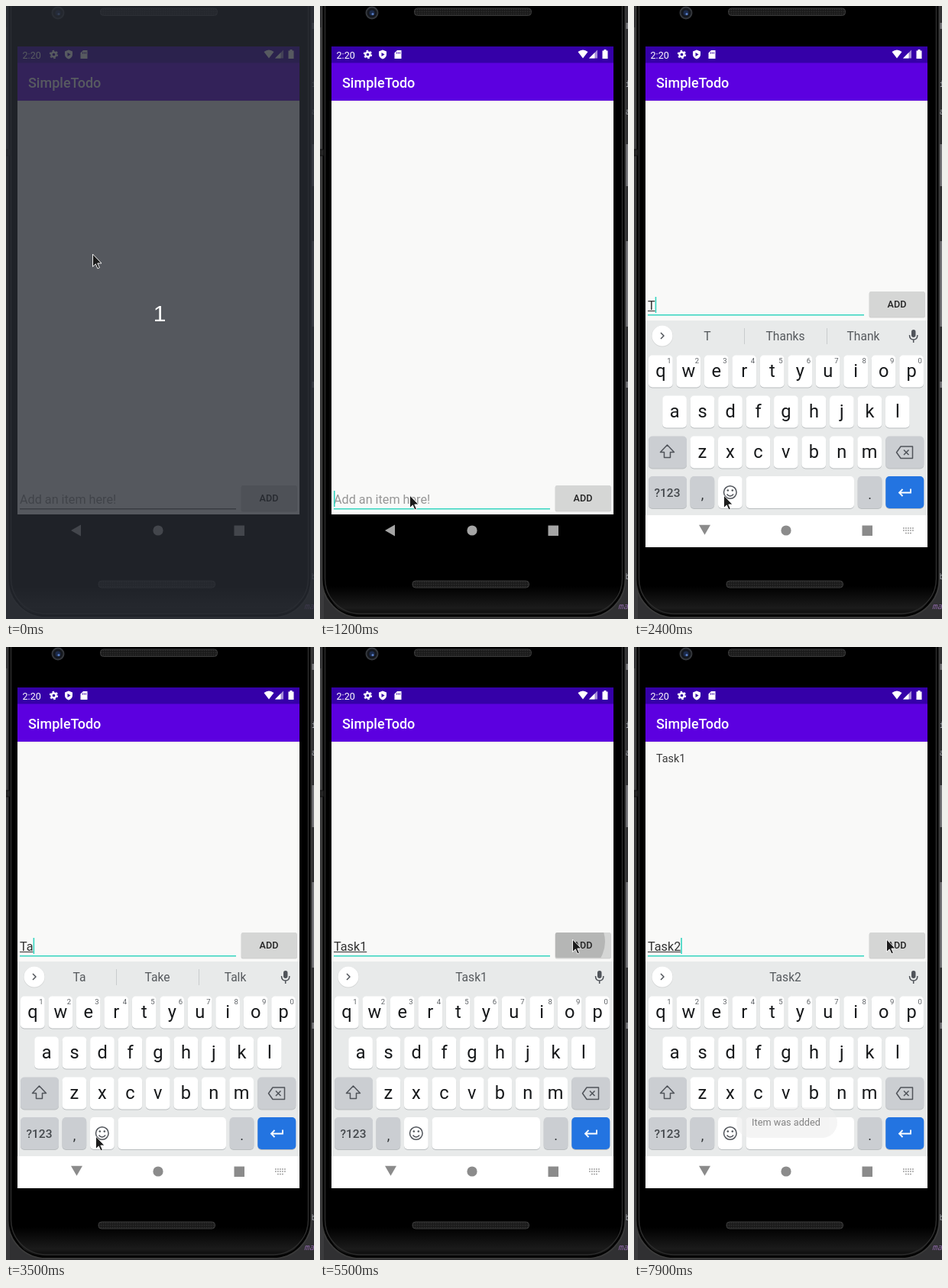
Animation, 403 px wide and 803 px high, one loop 8000 ms. Source, as an HTML page:

```html
<!DOCTYPE html>
<html lang="en">
<head>
<meta charset="utf-8">
<title>Todo app demo</title>
<style>
html, body { margin: 0; width: 100%; height: 100%; overflow: hidden; background: #000; }
svg { display: block; width: 100vw; height: 100vh; font-family: Roboto, sans-serif; }
.mid { text-anchor: middle; }
.line { fill: none; stroke: #50545a; stroke-width: 1.5; stroke-linejoin: round; }
.letter { font-size: 23.6px; fill: #16181a; text-anchor: middle; }
.sup { font-size: 9.5px; fill: #5c6064; text-anchor: middle; }
.word { font-size: 15.6px; fill: #55595d; text-anchor: middle; }
.field { font-size: 16.2px; }
</style>
</head>
<body>
<svg viewBox="0 0 403 803" preserveAspectRatio="none">
  <defs>
    <linearGradient id="bottomGloss" x2="0" y2="1">
      <stop offset="0" stop-color="#000"/><stop offset=".75" stop-color="#1b1b1b"/><stop offset="1" stop-color="#080808"/>
    </linearGradient>
    <pattern id="mesh" width="3" height="3" patternUnits="userSpaceOnUse">
      <rect width="3" height="3" fill="#1b1b1b"/><circle cx="1.5" cy="1.5" r=".8" fill="#303030"/>
    </pattern>
    <clipPath id="screenClip"><rect x="15" y="53" width="369" height="656"/></clipPath>
    <clipPath id="buttonClip"><rect x="308" y="628" width="72.500" height="33" rx="2"/></clipPath>
    <g id="gear" fill="none" stroke="currentColor">
      <circle r="3.900" stroke-width="3"/>
      <circle r="6.100" stroke-width="2.400" stroke-dasharray="3.190 3.190"/>
    </g>
  </defs>

  <!-- desktop behind the phone -->
  <rect width="403" height="803" fill="#303032"/>
  <rect y="28" width="5" height="164" fill="#4b4b4c"/>
  <rect y="196" width="5" height="607" fill="#3b3b3d"/>
  <g fill="#77777b">
    <rect x="400" y="181" width="3" height="55"/><rect x="400" y="308" width="3" height="112"/>
    <rect x="400" y="22" width="3" height="8"/><rect x="400" y="492" width="3" height="8"/>
  </g>
  <g font-family="Noto Sans Mono, monospace" font-size="11" fill="#b9bdc4">
    <text x="399.500" y="106">i</text><text x="399.500" y="142">a</text><text x="399.500" y="751">b</text>
    <text x="390" y="790" fill="#8d68a6" font-style="italic">ma</text>
  </g>

  <!-- phone body -->
  <rect x="2.500" y="-70" width="397" height="871" rx="50" fill="#000" stroke="#3a3a3a" stroke-width="2"/>
  <path d="M9 760H392Q386 797 350 798H50Q15 797 9 760Z" fill="url(#bottomGloss)"/>
  <rect x="6.500" y="-70" width="389" height="866" rx="46" fill="none" stroke="#2c2c2c" stroke-width="1.500"/>
  <path d="M0 188H5V196H0" fill="#262626" stroke="#111"/>
  <g fill="url(#mesh)" stroke="#3b3b3b">
    <rect x="123.500" y="3" width="153" height="9.500" rx="4"/>
    <rect x="121" y="753" width="152.500" height="9" rx="4"/>
  </g>
  <circle cx="68" cy="9" r="7.500" fill="#14171d" stroke="#34373c" stroke-width="2"/>
  <circle cx="68" cy="9" r="3.500" fill="#1c2b4c"/><circle cx="69" cy="10.500" r="1.500" fill="#5a80c8"/>

  <!-- app -->
  <rect x="15" y="124" width="369" height="542" fill="#f9f9f8"/>
  <rect x="15" y="53" width="369" height="22" fill="#3500a8"/>
  <rect x="15" y="74.500" width="369" height="49.500" fill="#5c00e0"/>
  <rect x="15" y="124" width="369" height="1" fill="#000" opacity=".06"/>
  <g fill="#fff" color="#fff">
    <text x="21.500" y="68.500" font-size="12.600">2:20</text>
    <text x="29" y="106.500" font-size="18" font-weight="500">SimpleTodo</text>
    <use href="#gear" transform="translate(62.500 63.500) scale(.78)"/>
    <path d="M82 57.500l5 2v4q0 4-5 6-5-2-5-6v-4Z"/>
    <path d="M80.500 61v5l4-2.500Z" fill="#3500a8"/>
    <path d="M101 58h5.500v11h-9v-7.500Z"/>
    <path d="M100.500 60.500v2m2-2v2m2-2v2" stroke="#3500a8"/>
    <path d="M337.500 60q6.500-5 13 0l-6.500 8.500Z"/>
    <path d="M363 57.500V68.500H352Z" opacity=".55"/><path d="M359.500 61V68.500H352Z"/>
    <path d="M369.500 58.500h2v-1.500h3v1.500h2v10.500h-7Z"/>
  </g>
  <text id="task" x="29" y="151" font-size="14.400" fill="#3b3b3b">Task1</text>

  <g id="entry">
    <text id="hint" class="field" x="18" y="651.500" fill="#969696">Add an item here!</text>
    <text id="typed" class="field" x="18" y="652" fill="#303030"></text>
    <rect id="underline" x="18" y="653" height="1" fill="#303030"/>
    <rect id="caret" y="635" width="1.600" height="21" fill="#35d5c0"/>
    <rect id="fieldLine" x="18" y="658" width="283" height="1.500"/>
    <rect x="307.500" y="628.500" width="73.500" height="34" rx="2.500" fill="#000" opacity=".16"/>
    <rect x="308" y="628" width="72.500" height="33" rx="2" fill="#d5d6d5"/>
    <circle id="ripple" cx="331" cy="640" clip-path="url(#buttonClip)"/>
    <text class="mid" x="344" y="649" font-size="12.600" font-weight="500" fill="#242424">ADD</text>
  </g>

  <g clip-path="url(#screenClip)">
    <g id="keyboard">
      <rect x="15" y="412" width="369" height="255" fill="#e8eaea"/>
      <rect x="15" y="667" width="369" height="70" fill="#fff"/>
      <circle cx="37" cy="432.500" r="14" fill="#000" opacity=".08"/>
      <circle cx="37" cy="432" r="13.500" fill="#fff"/>
      <path id="chevron" class="line" d="M35 428l4 4-4 4"/>
      <g id="tools" color="#50545a">
        <path class="line" d="M81 425.500h10q2 0 2 2v6l-5 5h-7q-2 0-2-2v-9q0-2 2-2ZM93 433.500h-3q-2 0-2 2v3M82.500 432q2.500 4 5 1M83 428.500v1.500m5-1.500v1.500"/>
        <text class="mid" x="139" y="436" font-size="11.500" font-weight="900" letter-spacing=".6" fill="#50545a">GIF</text>
        <path class="line" d="M187 426h12v13.500h-12ZM190.500 424.500h5v2h-5ZM189.500 430h7m-7 3h7m-7 3h5"/>
        <use href="#gear" transform="translate(246.500 432)"/>
        <path d="M279 423v18" stroke="#d0d3d4"/>
        <path d="M306 432h.01M312 432h.01M318 432h.01" stroke="#50545a" stroke-width="3.600" stroke-linecap="round"/>
      </g>
      <g id="words">
        <path id="dividers" d="M144.500 422v21M252.500 422v21" stroke="#c9cccd"/>
        <text class="word" x="96" y="438"></text>
        <text class="word" x="198" y="438"></text>
        <text class="word" x="300" y="438"></text>
      </g>
      <rect x="363" y="424" width="5.500" height="10" rx="2.700" fill="#50545a"/>
      <path class="line" d="M360.500 431q0 6 5.200 6t5.200-6M365.700 437v4"/>
      <g id="keys"></g>
      <path class="line" d="M43.500 575l-9 9.500h5v7h8v-7h5Z"/>
      <path class="line" d="M349 577h15.500v15.500H349l-5.500-7.700ZM353 581.500l6.500 6.500m0-6.500l-6.500 6.500"/>
      <text class="mid" x="43.500" y="643" font-size="15.500" font-weight="500" fill="#44484c">?123</text>
      <text class="mid" x="89.500" y="646" font-size="18" fill="#303336">,</text>
      <text class="mid" x="308.500" y="646" font-size="18" fill="#303336">.</text>
      <circle class="line" cx="125.800" cy="637" r="8.300"/>
      <path class="line" d="M121.500 639.500q4.300 5 8.600 0"/>
      <circle cx="122.800" cy="634.500" r="1.300" fill="#50545a"/><circle cx="128.800" cy="634.500" r="1.300" fill="#50545a"/>
      <path d="M362 632.500v5h-15m4.500-4.500l-4.500 4.500 4.500 4.500" fill="none" stroke="#fff" stroke-width="1.800"/>
    </g>
    <g id="nav">
      <path id="back" d="M85 687L98 679.500V694.500Z"/>
      <circle cx="199" cy="687" r="6.600"/>
      <rect x="298.500" y="680.500" width="13.500" height="13.500"/>
      <path id="imeIcon" d="M352 684h14M352 687h14M355 690.500h8" stroke="#999" stroke-width="1.500" stroke-dasharray="1.800 1.200"/>
    </g>
  </g>

  <g id="toast">
    <rect x="134" y="603" width="132" height="40" rx="20" fill="#eee"/>
    <text class="mid" x="199" y="627" font-size="12.700" fill="#303030">Item was added</text>
  </g>

  <g id="countdown">
    <rect width="403" height="803" fill="#282c34" opacity=".78"/>
    <text class="mid" x="201" y="412.500" font-family="Liberation Sans, sans-serif" font-size="30" fill="#fff">1</text>
  </g>
  <path id="cursor" d="M-.5 0V16.500l3.800-3.600 2.600 6 2.500-1.100-2.600-5.800h5.200Z" fill="#1c1c1c" stroke="#fff" stroke-width=".9"/>
</svg>

<script>
const LOOP = 8000, STEP = 100, RAISED = -254;
const $ = id => document.getElementById(id);
const show = (id, on) => $(id).setAttribute('visibility', on ? 'visible' : 'hidden');
const set = (id, attrs) => {
  for (const name in attrs) $(id).setAttribute(name, attrs[name]);
};

function buildKeys() {
  const pitch = 36.47;
  const key = (x, y, w, fill = '#fff') =>
    `<rect x="${x}" y="${y + 1}" width="${w}" height="42" rx="5" fill="#b9bdbf"/>` +
    `<rect x="${x}" y="${y}" width="${w}" height="42" rx="5" fill="${fill}"/>`;
  const row = (letters, left, y, digits) => [...letters].map((c, i) => {
    const x = left + i * pitch;
    const sup = digits ? `<text class="sup" x="${x + 27}" y="${y + 10.5}">${(i + 1) % 10}</text>` : '';
    return key(x, y, 31.7) + `<text class="letter" x="${x + 15.9}" y="${y + 28}">${c}</text>` + sup;
  }).join('');
  const gray = '#cbced2';
  $('keys').innerHTML =
    row('qwertyuiop', 19, 457.5, true) + row('asdfghjkl', 37.2, 510.5) + row('zxcvbnm', 73.5, 563.5) +
    key(19, 563.5, 50, gray) + key(329.3, 563.5, 50, gray) +
    key(19, 616, 50, gray) + key(73.5, 616, 31.7, gray) + key(110, 616, 31.7) +
    key(146.5, 616, 141.5) + key(292.7, 616, 31.7, gray) + key(329.3, 616, 50, '#2374e1');
}

// Each track lists [start time, value...]; the latest started entry holds.
const tracks = {
  cursor: [[0, 114, 325], [600, 115, 365], [700, 116, 500], [800, 118, 615], [900, 118, 641],
    [4400, 138, 612], [4500, 235, 505], [4600, 340, 412], [4700, 382, 385], [4800, 330, 387],
    [5000, 330, 385], [5100, 331, 384], [5200, 331, 383]],
  caret: [[0, 0], [1100, 1], [1500, 0], [2100, 1], [2800, 0], [3300, 1], [4500, 0],
    [5000, 1], [5500, 0], [6100, 1]],
  // text, length of the composing underline
  text: [[0, '', 0], [2400, 'T', 1], [3500, 'Ta', 2], [3700, 'Task', 4], [3800, 'Task1', 4],
    [4000, 'Task1', 5], [5700, '', 0], [6600, 'T', 0], [6900, 'T', 1], [7200, 'Ta', 1],
    [7400, 'Tas', 3], [7700, 'Task', 4], [7800, 'Task2', 5]],
  words: [[0], [2400, 'T', 'Thanks', 'Thank'], [3500, 'Ta', 'Take', 'Talk'],
    [3700, 'Task', 'Tasks', 'Tasks'], [3800, '', 'Task1', ''], [5700],
    [6900, 'T', 'Thanks', 'Thank'], [7400, 'Ta', 'Task', 'Tasks'], [7500, 'Tas', 'Task', 'Tasks'],
    [7700, 'Task', 'Tasks', 'Tasks'], [7800, '', 'Task2', '']],
  // offset, opacity, rotation of the back icon
  keyboard: [[0, 0, 0, 0], [1700, 62, .4, -15], [1800, 38, .85, -50], [1900, 19.5, 1, -80],
    [2000, 6, 1, -90], [2100, 0, 1, -90]],
  ripple: [[0, 0, 0], [5500, 42, .15], [5600, 60, .17], [5700, 60, .12], [5800, 60, .06], [5900, 0, 0]],
  toast: [[0, 0], [5800, .3], [5900, .7], [6000, 1], [7800, .85], [7900, .6]]
};
const at = (name, t) => tracks[name].filter(entry => entry[0] <= t).pop().slice(1);

function draw(t) {
  const [x, y] = at('cursor', t);
  set('cursor', { transform: `translate(${x} ${y})` });
  show('countdown', t < 200);

  const [text, marked] = at('text', t);
  const typed = $('typed');
  typed.textContent = text;
  const width = n => n ? typed.getSubStringLength(0, n) : 0;
  set('underline', { width: width(marked) });
  set('caret', { x: 18 + width(text.length) });
  show('caret', at('caret', t)[0]);
  show('hint', !text);
  set('fieldLine', { fill: t < 900 ? '#777' : '#35d5c0' });
  set('entry', { transform: `translate(0 ${t < 1700 ? 0 : RAISED})` });
  show('task', t >= 5700);

  const [r, shade] = at('ripple', t);
  set('ripple', { r, opacity: shade });

  const [offset, opacity, angle] = at('keyboard', t);
  set('keyboard', { transform: `translate(0 ${offset})`, opacity });
  set('back', { transform: `rotate(${angle} 91.65 686.15)` });
  set('nav', { fill: t < 1700 ? '#a5a5a5' : '#8b8b8b' });
  show('imeIcon', t >= 1800);

  const words = at('words', t);
  show('tools', !words.length);
  show('words', words.length);
  show('dividers', words[0]);
  document.querySelectorAll('.word').forEach((el, i) => el.textContent = words[i] || '');
  set('chevron', { transform: words.length ? '' : 'rotate(180 37 432)' });
  set('toast', { opacity: at('toast', t)[0] });
}

function frame() {
  const t = performance.now() % LOOP;
  draw(Math.floor(t / STEP) * STEP);
  requestAnimationFrame(frame);
}

buildKeys();
frame();
</script>
</body>
</html>
```
